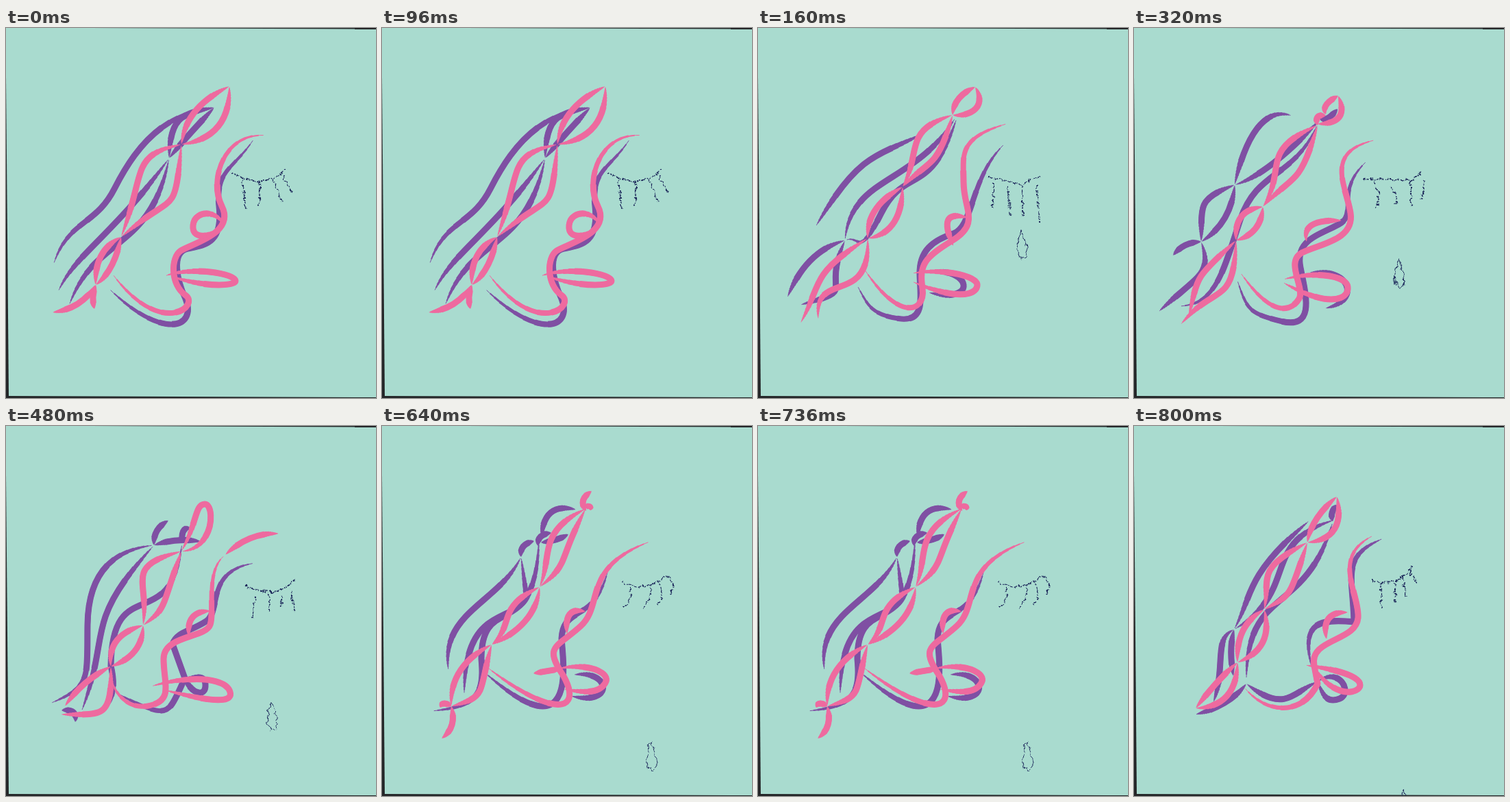
These frames come from a looping animation (540x540 px, 960 ms). An HTML page without scripts:

```html
<!DOCTYPE html>
<html lang="en">
<head>
<meta charset="utf-8">
<title>Ribbon face</title>
<style>
html, body { margin: 0; width: 100%; height: 100%; overflow: hidden; background: #242628; }
svg { display: block; width: 100vw; height: 100vh; }
/* six poses lie side by side and are stepped past the stage */
.strip { animation: step 960ms steps(6) infinite; }
@keyframes step { to { transform: translateX(-3240px); } }
.strip g { fill: none; stroke-linejoin: round; }
/* stacked strokes: the wider, the further from the ends, which tapers each ribbon */
.strip use {
  --s: calc(var(--w) * (.9 + var(--w) * .2));
  stroke-width: calc(var(--w) * 1px);
  stroke-dasharray: 0 calc(var(--s) * 1px) calc((100 - 2 * var(--s)) * 1px) 200px;
}
.shade { stroke: #7f4fa3; }
.line { stroke: #ee6a9f; }
.dots { stroke: #1b2659; stroke-linecap: round; filter: url(#scatter); }
.dots path { stroke-width: 2.3px; stroke-dasharray: .4 3.2 0 4.4 .8 2.6 0 3.6; }
</style>
</head>
<body>
<svg viewBox="0 0 540 540">
<defs>
  <filter id="scatter" filterUnits="userSpaceOnUse" x="0" y="0" width="3240" height="540" color-interpolation-filters="sRGB">
    <feTurbulence type="fractalNoise" baseFrequency=".16" seed="4"/>
    <feDisplacementMap in="SourceGraphic" scale="9" xChannelSelector="R" yChannelSelector="G"/>
  </filter>
  <path id="tear" d="M6 0Q-4 28 4 40Q12 46 15 34Q14 18 6 0"/>

  <g id="shade">
    <g>
      <path pathLength="100" d="M69 346C90 280 130 290 158 235S225 125 304 116"/>
      <path pathLength="100" d="M76 385C100 330 160 300 238 190"/>
      <path pathLength="100" d="M238 190Q262 160 304 116"/>
      <path pathLength="100" d="M238 190C240 130 255 125 304 116"/>
      <path pathLength="100" d="M92 405C130 300 210 330 238 190"/>
      <path pathLength="100" d="M363 160C335 205 305 205 311 260S290 317 265 322 250 370 262 395C280 440 225 455 149 379"/>
    </g>
    <g transform="translate(540)">
      <path pathLength="100" d="M84 290C150 180 170 190 243 153"/>
      <path pathLength="100" d="M288 131C230 230 135 215 127 310"/>
      <path pathLength="100" d="M290 132C250 250 215 200 180 270S150 300 127 310"/>
      <path pathLength="100" d="M127 310Q70 325 43 393"/>
      <path pathLength="100" d="M127 310C90 390 150 380 62 404"/>
      <path pathLength="100" d="M361 168C310 215 315 290 285 300S235 325 236 360 245 430 205 424 160 405 144 374"/>
      <path pathLength="100" d="M245 357C310 345 325 405 249 386"/>
    </g>
    <g transform="translate(1080)">
      <path pathLength="100" d="M230 128C180 110 155 190 147 229"/>
      <path pathLength="100" d="M147 229Q195 215 270 135"/>
      <path pathLength="100" d="M268 140C235 220 180 205 155 280S120 405 65 406"/>
      <path pathLength="100" d="M147 229C90 250 100 260 98 312"/>
      <path pathLength="100" d="M147 229Q142 285 98 312"/>
      <path pathLength="100" d="M98 312Q72 312 57 332"/>
      <path pathLength="100" d="M98 312C115 360 95 360 36 414"/>
      <path pathLength="100" d="M270 127Q278 142 297 118"/>
      <path pathLength="100" d="M341 193C290 240 330 270 298 287S235 310 243 350 265 440 215 428 165 410 150 366"/>
      <path pathLength="100" d="M256 357C320 350 330 400 279 409"/>
    </g>
    <g transform="translate(1620)">
      <path pathLength="100" d="M237 138Q214 150 216 174"/>
      <path pathLength="100" d="M216 174C160 180 120 210 119 290S125 380 64 405"/>
      <path pathLength="100" d="M216 174C110 290 155 300 110 417"/>
      <path pathLength="100" d="M216 174Q250 162 285 169"/>
      <path pathLength="100" d="M257 171Q255 145 270 150"/>
      <path pathLength="100" d="M257 171C240 310 155 210 153 350C165 400 145 425 100 423"/>
      <path pathLength="100" d="M81 415Q105 412 101 432"/>
      <path pathLength="100" d="M364 200C290 210 315 270 292 285S250 300 243 318L261 368C235 425 240 430 157 388"/>
      <path pathLength="100" d="M260 357C260 385 290 400 291 380S275 368 255 370"/>
    </g>
    <g transform="translate(2160)">
      <path pathLength="100" d="M283 122Q235 110 233 163"/>
      <path pathLength="100" d="M247 156Q225 158 228 175"/>
      <path pathLength="100" d="M232 170Q255 168 272 158"/>
      <path pathLength="100" d="M222 168Q200 172 203 191"/>
      <path pathLength="100" d="M203 191C170 260 85 270 97 357"/>
      <path pathLength="100" d="M203 191L211 250C190 290 120 260 120 392"/>
      <path pathLength="100" d="M229 165C225 320 145 240 145 340C150 390 140 410 72 416"/>
      <path pathLength="100" d="M330 210C310 290 265 260 262 310C265 350 285 480 148 358"/>
      <path pathLength="100" d="M280 363C335 355 340 410 276 394"/>
    </g>
    <g transform="translate(2700)">
      <path pathLength="100" d="M256 138C160 220 175 245 146 297"/>
      <path pathLength="100" d="M293 137C180 170 245 240 146 297"/>
      <path pathLength="100" d="M290 140C250 280 165 230 164 370"/>
      <path pathLength="100" d="M297 115Q285 125 290 139"/>
      <path pathLength="100" d="M146 297C115 310 135 350 116 403"/>
      <path pathLength="100" d="M146 297Q138 325 145 365"/>
      <path pathLength="100" d="M164 376Q140 408 90 421"/>
      <path pathLength="100" d="M364 164C300 190 320 220 321 286C265 280 245 290 259 352"/>
      <path pathLength="100" d="M164 376C220 420 230 390 268 373"/>
      <path pathLength="100" d="M268 373C300 350 320 390 300 398S275 390 268 373"/>
    </g>
  </g>

  <g id="line">
    <g>
      <path pathLength="100" d="M326 85Q262 115 256 170"/>
      <path pathLength="100" d="M326 85Q328 160 256 170"/>
      <path pathLength="100" d="M256 170C180 185 205 210 168 305"/>
      <path pathLength="100" d="M256 170C245 280 250 235 168 305"/>
      <path pathLength="100" d="M168 305Q128 325 131 375"/>
      <path pathLength="100" d="M168 305Q158 355 131 375"/>
      <path pathLength="100" d="M131 375Q110 410 68 415"/>
      <path pathLength="100" d="M131 375Q124 392 129 410"/>
      <path pathLength="100" d="M381 157C320 150 295 220 315 260S270 315 255 325 240 375 262 390 225 455 154 357"/>
      <path pathLength="100" d="M318 289C310 265 275 265 273 288S300 305 318 289"/>
      <path pathLength="100" d="M232 362C260 350 320 355 333 366S290 380 240 362"/>
    </g>
    <g transform="translate(540)">
      <path pathLength="100" d="M317 86Q285 100 284 127"/>
      <path pathLength="100" d="M317 86C335 115 310 130 284 127"/>
      <path pathLength="100" d="M284 127C210 150 240 180 211 232"/>
      <path pathLength="100" d="M284 127C260 210 250 190 211 232"/>
      <path pathLength="100" d="M211 232Q158 260 160 307"/>
      <path pathLength="100" d="M211 232Q210 300 160 307"/>
      <path pathLength="100" d="M160 307C75 360 95 370 62 431"/>
      <path pathLength="100" d="M160 307C165 410 80 350 88 425"/>
      <path pathLength="100" d="M366 139C290 160 300 185 300 225S325 285 284 310 235 345 240 380 205 430 154 350"/>
      <path pathLength="100" d="M306 277C265 265 275 295 285 318"/>
      <path pathLength="100" d="M225 358C270 350 322 362 320 376S290 398 225 370"/>
    </g>
    <g transform="translate(1080)">
      <path pathLength="100" d="M298 99Q272 112 280 126"/>
      <path pathLength="100" d="M298 99C312 130 295 140 268 140"/>
      <path pathLength="100" d="M280 128Q262 125 268 142"/>
      <path pathLength="100" d="M268 142C180 180 225 205 188 261"/>
      <path pathLength="100" d="M268 142C240 235 235 210 188 261"/>
      <path pathLength="100" d="M188 261Q145 265 149 310"/>
      <path pathLength="100" d="M188 261Q186 300 149 310"/>
      <path pathLength="100" d="M149 310C85 370 95 360 80 420"/>
      <path pathLength="100" d="M149 310C145 410 120 370 68 433"/>
      <path pathLength="100" d="M354 163C275 180 310 230 316 270S270 315 245 328 250 380 241 395 205 430 154 355"/>
      <path pathLength="100" d="M303 281C270 280 245 285 252 312"/>
      <path pathLength="100" d="M218 367C260 355 310 360 312 378S285 410 217 371"/>
    </g>
    <g transform="translate(1620)">
      <path pathLength="100" d="M256 183C280 140 275 115 290 114S305 180 256 183"/>
      <path pathLength="100" d="M256 183C170 205 210 225 200 291"/>
      <path pathLength="100" d="M256 183C225 270 235 265 200 291"/>
      <path pathLength="100" d="M200 291Q147 305 153 351"/>
      <path pathLength="100" d="M200 291Q200 335 153 351"/>
      <path pathLength="100" d="M153 351Q110 372 86 409"/>
      <path pathLength="100" d="M153 351C155 430 140 420 80 421"/>
      <path pathLength="100" d="M398 157Q355 155 320 188"/>
      <path pathLength="100" d="M320 188C290 210 305 270 298 290S230 305 230 340 245 400 210 408 155 385 153 365"/>
      <path pathLength="100" d="M298 270Q262 270 267 307"/>
      <path pathLength="100" d="M212 380C260 365 320 365 327 388S270 395 230 385"/>
    </g>
    <g transform="translate(2160)">
      <path pathLength="100" d="M306 95Q285 108 298 124"/>
      <path pathLength="100" d="M296 118Q306 115 304 123"/>
      <path pathLength="100" d="M297 121C225 155 250 190 230 235"/>
      <path pathLength="100" d="M297 121C255 200 275 200 230 235"/>
      <path pathLength="100" d="M230 235C165 265 195 290 160 319"/>
      <path pathLength="100" d="M230 235Q225 290 160 319"/>
      <path pathLength="100" d="M160 319Q98 350 101 409"/>
      <path pathLength="100" d="M160 319C140 390 155 395 101 409"/>
      <path pathLength="100" d="M101 409Q88 400 85 411"/>
      <path pathLength="100" d="M101 409Q110 440 87 456"/>
      <path pathLength="100" d="M393 168C290 205 325 260 290 292S235 320 265 365C295 420 245 425 151 350"/>
      <path pathLength="100" d="M297 271Q265 262 270 303"/>
      <path pathLength="100" d="M221 361Q240 358 262 354"/>
      <path pathLength="100" d="M258 354C300 345 335 360 326 375S300 390 265 384"/>
    </g>
    <g transform="translate(2700)">
      <path pathLength="100" d="M296 103Q258 135 253 170"/>
      <path pathLength="100" d="M296 103Q310 165 253 170"/>
      <path pathLength="100" d="M253 170C175 210 200 220 190 268"/>
      <path pathLength="100" d="M253 170C225 255 230 245 190 268"/>
      <path pathLength="100" d="M190 268Q148 290 151 345"/>
      <path pathLength="100" d="M190 268Q205 325 151 345"/>
      <path pathLength="100" d="M151 345Q120 372 90 412"/>
      <path pathLength="100" d="M151 345Q150 410 90 412"/>
      <path pathLength="100" d="M351 159C285 190 330 245 327 280S255 310 263 350L268 376C245 425 190 420 160 380"/>
      <path pathLength="100" d="M312 272Q272 270 281 311"/>
      <path pathLength="100" d="M250 349C295 355 330 365 330 378S290 400 262 350"/>
    </g>
  </g>
</defs>

<path fill="#a9dbcf" d="M0 0H120L540 1.5V539L4 537L0 70Z"/>
<g class="strip">
  <g class="shade">
    <use href="#shade" style="--w:1"/><use href="#shade" style="--w:2"/><use href="#shade" style="--w:3"/>
    <use href="#shade" style="--w:4"/><use href="#shade" style="--w:5"/><use href="#shade" style="--w:6"/>
    <use href="#shade" style="--w:7"/><use href="#shade" style="--w:8"/><use href="#shade" style="--w:9"/>
  </g>
  <g class="line">
    <use href="#line" style="--w:1"/><use href="#line" style="--w:2"/><use href="#line" style="--w:3"/>
    <use href="#line" style="--w:4"/><use href="#line" style="--w:5"/><use href="#line" style="--w:6"/>
    <use href="#line" style="--w:7"/><use href="#line" style="--w:8"/><use href="#line" style="--w:9"/>
  </g>
  <g class="dots">
    <path d="M330 212Q378 238 409 205M345 222l5 43M370 226v38M390 222l12 32M404 216l14 26"/>
    <g transform="translate(540)">
      <path d="M337 218L385 228 415 215M343 228v37M364 232l4 43M386 230v47M407 230l4 53"/>
      <use href="#tear" x="378" y="295"/>
    </g>
    <g transform="translate(1080)">
      <path d="M337 220L408 222 419 209M350 225q12 15 4 37M375 233q11 9 7 25M404 224v34M423 225l-3 25"/>
      <use href="#tear" x="380" y="338"/>
    </g>
    <g transform="translate(1620)">
      <path d="M349 234Q400 255 422 222M364 250l-5 30M384 246v26M402 247v17M416 240l4 30"/>
      <use href="#tear" x="381" y="402"/>
    </g>
    <g transform="translate(2160)">
      <path d="M352 228Q380 245 417 218M362 238q4 20-12 28M392 236q2 16-12 32M404 228q8 20-2 34M417 218q13 17 3 30"/>
      <use href="#tear" x="386" y="460"/>
    </g>
    <g transform="translate(2700)">
      <path d="M347 225Q385 238 407 203M361 230v36M381 230v28M393 222l5 28M403 213l11 17"/>
      <use href="#tear" x="387" y="530"/>
    </g>
  </g>
</g>
</svg>
</body>
</html>
```
